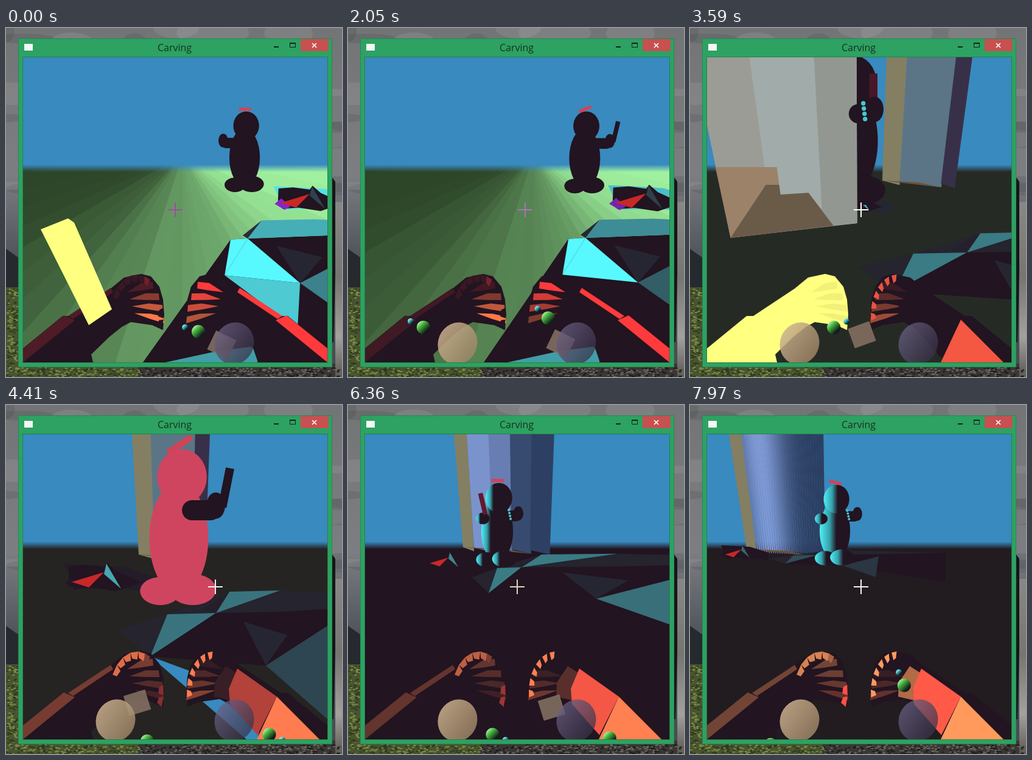
Animation of 552 by 572 pixels, one loop 8 s. Source, as an HTML page with a canvas:

```html
<!DOCTYPE html>
<html lang="en">
<head>
<meta charset="utf-8">
<title>Carving</title>
<style>
html, body { margin: 0; height: 100%; overflow: hidden; background: #444; }
canvas { display: block; }
</style>
</head>
<body>
<canvas id="stage" width="552" height="572"></canvas>
<script>
const ctx = document.getElementById('stage').getContext('2d');
const LOOP = 8000;
const TIMES = [0, 2050, 2730, 3590, 4410, 6360, 7970];
const DARK = '#221420', SKY = '#388abf', YELLOW = '#ffff80', CYAN = '#58f8ff';
let now = 0;

// ---- helpers ----
const rgb = hex => [1, 3, 5].map(i => parseInt(hex.substr(i, 2), 16));
function mix(a, b, k) {
  if (typeof a === 'number') return a + (b - a) * k;
  if (typeof a === 'string') return '#' + mix(rgb(a), rgb(b), k)
    .map(v => Math.round(v).toString(16).padStart(2, '0')).join('');
  return a.map((v, i) => mix(v, b[i], k));
}
// Interpolates values given for the key times.
function key(...values) {
  let i = 0;
  while (i < 5 && now >= TIMES[i + 1]) i++;
  return mix(values[i], values[i + 1], Math.min(1, (now - TIMES[i]) / (TIMES[i + 1] - TIMES[i])));
}
const late = (...values) => key(0, 0, 0, ...values);
const during = (a, b) => now >= a && now < b;
const clamp = v => Math.max(0, Math.min(1, v));
function shape(color, path) {
  ctx.fillStyle = color;
  ctx.fill(new Path2D((typeof path === 'string' ? path : 'M' + path.join(' ')) + 'Z'));
}
function box(color, x, y, w, h) {
  ctx.fillStyle = color;
  ctx.fillRect(x, y, w, h);
}
function oval(color, x, y, rx, ry = rx, turn = 0) {
  ctx.fillStyle = color;
  ctx.beginPath();
  ctx.ellipse(x, y, rx, ry, turn, 0, 7);
  ctx.fill();
}
function line(color, width, x0, y0, x1, y1, cap = 'butt') {
  ctx.strokeStyle = color;
  ctx.lineWidth = width;
  ctx.lineCap = cap;
  ctx.beginPath();
  ctx.moveTo(x0, y0);
  ctx.lineTo(x1, y1);
  ctx.stroke();
}
function ramp(x0, y0, x1, y1, ...stops) {
  const g = ctx.createLinearGradient(x0, y0, x1, y1);
  stops.forEach(([at, color]) => g.addColorStop(at, color));
  return g;
}
function randoms(seed) {
  return () => (seed = seed * 16807 % 2147483647) / 2147483647;
}

// ---- desktop and window frame ----
function desktop() {
  const rnd = randoms(11);
  box(ramp(0, 0, 0, 400, [0, '#737476'], [.6, '#7c7e82'], [1, '#484c54']), 0, 0, 552, 572);
  for (let i = 0; i < 70; i++) {
    ctx.globalAlpha = .12;
    oval(i % 2 ? '#c8c8c8' : '#202226', rnd() * 552, rnd() * 330, 12 + rnd() * 50, 6 + rnd() * 18);
  }
  ctx.globalAlpha = 1;
  shape('#26292e', 'M0 362 20 376 20 430 0 430');
  box('#48552f', 0, 425, 220, 147);
  box('#3a3734', 217, 550, 335, 22);
  box(ramp(0, 245, 0, 572, [0, '#8d8e8e'], [.5, '#777570'], [.8, '#a2a19d'], [1, '#5c5852']), 541, 285, 11, 287);
  shape('#15161a', 'M536 245 541 252 541 400 538 515 536 515');
  for (let i = 0; i < 500; i++) {
    const x = rnd() * 552, y = 556 + rnd() * 16;
    box(x < 217 ? (i % 2 ? '#7c8a45' : '#2c3620') : (i % 2 ? '#6c665e' : '#1c1b1c'), x, y, 4, 2);
    if (i < 150) box(i % 2 ? '#7d8a48' : '#2f381f', rnd() * 18, 425 + rnd() * 140, 4, 2);
  }
}
function windowFrame() {
  box('#248a50', 20, 17, 516, 539);
  box('#2da262', 21, 18, 514, 537);
  box('#24824c', 27, 47, 502, 502);
  box('#f4f7f5', 30, 26, 14, 11);
  ctx.font = '16px "Open Sans", "Noto Sans", sans-serif';
  ctx.textAlign = 'center';
  ctx.fillStyle = '#17321f';
  ctx.fillText('Carving', 277, 38);
  box('#17241c', 440, 30, 8, 2);
  box('#17241c', 466, 24, 10, 8);
  box('#2da262', 467, 26, 8, 5);
  box('#c75050', 484, 18, 46, 20);
  line('#fff', 1.7, 503, 25, 510, 32);
  line('#fff', 1.7, 510, 25, 503, 32);
}

// ---- world ----
// Wedges fan out from beyond the horizon, brightest towards the light.
function ground() {
  const base = key('#2c4427', '#2c4427', '#2c4427', '#262a25', '#252422', DARK, '#221c21');
  const light = key(1, 1, -1, 0, 0, 0, 0);
  const middle = key(.5, .38, .65, 0, 0, 0, 0);
  const hub = key(290, 305, 240, 270, 270, 270, 270);
  const rnd = randoms(5), count = 30;
  ctx.save();
  ctx.beginPath();
  ctx.rect(28, 224, 500, 324);
  ctx.clip();
  for (let i = 0; i < count; i++) {
    const a = i / count * Math.PI, b = (i + 1.1) / count * Math.PI;
    const side = Math.cos((a + b) / 2) * light;
    const reach = Math.abs(side) ** 1.8;
    const level = middle + (side > 0 ? 1 - middle : -middle) * reach - rnd() * .12 * middle;
    shape(mix(base, '#a5faa5', level), [hub, 208, hub + 900 * Math.cos(a), 208 + 900 * Math.sin(a),
      hub + 900 * Math.cos(b), 208 + 900 * Math.sin(b)]);
  }
  ctx.restore();
  box(ramp(0, 224, 0, 236, [0, SKY], [1, 'rgba(56,138,191,0)']), 28, 223, 500, 13);
}

// The block is carved from two faces to four, then to a round column.
function pillar() {
  const entry = [563, 704, 556, 675, 258];
  const [left, right, footLeft, footRight, y] = key(entry, entry, entry, [323, 464, 316, 435, 256],
    [207, 335, 218, 327, 251], [174, 337, 189, 330, 239], [64, 219, 93, 222, 242]);
  const tan = .24 - .11 * clamp((now - 4410) / 1500);
  const strip = (color, a, b) => shape(color, [mix(left, right, a), 48, mix(left, right, b), 48,
    mix(footLeft, footRight, b), y + 6 * b, mix(footLeft, footRight, a), y - 6 + 6 * a]);
  strip('#847f62', 0, tan);
  const faces = now < 5200 ? 2 : now < 7000 ? 4 : 32;
  for (let i = 0; i < faces; i++) {
    const middle = (i + .5) / faces;
    const glow = Math.exp(-(((middle - .2) / .3) ** 2));
    if (faces === 2) strip(i ? '#383049' : '#5b7586', i ? .81 : tan, i ? 1 : .815);
    else strip(mix('#2c3f62', '#8098d4', glow), mix(tan, 1, i / faces), mix(tan, 1, (i + 1.05) / faces));
  }
  shape('#6b5238', [footLeft, y - 6, mix(footLeft, footRight, .8), y + 5, mix(footLeft, footRight, .5), y - 3]);
}

function slab() {
  if (!during(3150, 4290)) return;
  ctx.save();
  ctx.translate((3590 - now) * .35, 0);
  shape('#9c9c96', 'M5 48 274 48 275 320 67 344');
  shape('#9b8269', 'M42 228 143 228 150 273 236 324 67 344');
  shape('#6a5b48', 'M125 257 195 257 236 324 67 344');
  shape('#a1acaa', 'M98 48 205 48 218 300 195 270 149 273 143 228 123 228');
  shape('#929891', 'M204 48 274 48 275 320 236 324 217 299');
  ctx.restore();
}

function debris() {
  const [x, y, size] = key([499, 272, .9], [490, 271, .95], [440, 272, 1], [278, 283, .6],
    [161, 274, 1], [165, 250, .58], [84, 237, .5]);
  const glow = key(.9, .75, .5, .08, .04, 0, 0);
  ctx.save();
  ctx.translate(x, y);
  ctx.scale(size, size);
  shape(mix(DARK, CYAN, glow), 'M-66-14-20-12 30-9 90 10 86 34 20 26-46 28');
  shape(DARK, 'M-57-10-30-12 0-8 5-15 20-2 62 17 20 31-20 25-50 27-58 12');
  shape(mix(DARK, '#9028d8', glow), 'M-64 18-52 8-35 23-46 29');
  shape('#c82828', 'M-53 16 0 0-25 25');
  shape(mix(DARK, CYAN, key(.2, .2, .2, .65, .65, .5, .35)), 'M4-14 28 27 0 3');
  ctx.restore();
}

// One faceted rock around its ridge; the view stretches each side of it.
function rock() {
  const [x, y, west, east, height] = key([397, 345, .35, 1.05, .85], [390, 344, .35, 1.05, .85],
    [520, 360, .95, 1.2, .8], [455, 368, 1.1, 1, .9], [345, 341, 1, 1, 1], [285, 266, .5, 1.5, .6], [210, 246, .5, .5, .2]);
  const at = (px, py) => [x + px * (px < 0 ? west : east), y + py * height];
  const brow = at(-80, 2), low = at(-108, 71), ridge = at(0, 0), hub = at(82, 86),
    peak = at(22, -35), back = at(105, -37), far = at(420, -20), deep = at(420, 220);
  const glow = key(.9, .7, .6, .45, .42, .45, .25), front = key(1, 1, 1, 0, 0, 0, 0);
  const shade = level => mix(DARK, CYAN, level);
  const near = now < 3200;

  if (!near) shape('#25242f', [...at(-162, 27), ...brow, ...peak, ...back, ...far, ...hub, ...low]);
  shape(DARK, near ? [...brow, ...ridge, ...far, 900, 700, key(222, 220, 440, 400, 400, 400, 400), 552]
    : [...low, ...ridge, ...at(105, -2), ...far, ...deep, ...hub]);
  shape(shade(glow * (near ? .75 : 1)), [...ridge, ...peak, ...back, ...(near ? far : ridge)]);
  shape(shade(Math.max(glow, front)), [...brow, ...ridge, ...low]);
  shape(shade(front), [...ridge, ...hub, ...low]);
  shape(shade(glow * .12), [...ridge, ...at(-23, -6), ...peak]);
  shape(shade(.08), [...at(45, 14), ...at(117, 36), ...hub]);
  shape(shade(key(.48, .32, .28, .2, .22, .4, .15)), [...hub, ...at(200, 10), ...at(190, 180)]);
  if (now < 1000) shape(shade(.8), [...low, ...hub, ...at(78, 176)]);
  if (now < 2400) shape(shade(.6), 'M262 548 345 530 405 522 414 548');
  if (during(3900, 5600)) shape(SKY, [...low, ...at(20, 118), ...at(85, 207), ...at(50, 207)]);
}

// The figure is built in units of its own height.
function figure() {
  const [x, foot, h] = key([392, 269, 132], [389, 271, 134], [308, 279, 160], [262, 290, 245],
    [284, 328, 255], [245, 266, 138], [238, 263, 132]);
  const top = foot - h;
  const skin = during(3900, 5200) ? '#cf4560' : DARK;
  const rim = .15 + .4 * clamp((now - 5600) / 2000);
  const part = (px, py, rx, ry) => {
    const cx = x + px * h, r = rx * h;
    oval(now < 5200 ? skin : ramp(cx - r, 0, cx + r, 0, [0, '#50f0f4'], [rim * .6, '#35a0ac'], [rim, DARK]),
      cx, top + py * h, r, ry * h);
  };
  const tilt = key(0, -.03, .03, 0, -.05, 0, .02) * h;
  line('#d04458', .04 * h, x - .07 * h, top - .03 * h - tilt, x + .08 * h, top - .03 * h + tilt);
  part(0, .57, .19, .36);
  part(-.12, .91, .13, .09);
  part(.09, .9, .15, .1);
  part(.02, .176, .16, .178);
  if (now > 5200) part(-.17, .42, .08, .07);

  return () => {
    const side = key(-.95, 1.1, 1.1, .6, .85, .9, 1);
    const hand = x + side * .28 * h, shoulder = x + side * .1 * h, y = top + .39 * h;
    if (during(1000, 2400) || during(3000, 7000)) {
      const grip = x + key(.35, .35, .35, .16, .28, -.14, -.1) * h;
      line(mix(DARK, '#701c30', late(.5, 0, .8, .8)), .055 * h, grip, y - .02 * h,
        grip + key(.06, .06, .04, 0, .05, -.06, -.05) * h, y - .27 * h);
    }
    line(DARK, .13 * h, shoulder, y, hand - side * .04 * h, y, 'round');
    oval(DARK, hand, y - .03 * h, .06 * h, .085 * h);
    if (during(3300, 3900) || now > 5700)
      for (let i = 0; i < 4; i++) oval('#48c8d0', mix(shoulder, hand, .3) + i, y + (i - 2) * .035 * h, .015 * h);
  };
}

// ---- arms, tools and floating things ----
const ARM = 'M28 525 93 472 104 472 172 427 194 409 222 403 238 407 252 424 258 445 260 470 258 495 240 487 205 482 190 490 170 506 140 535 143 548 28 548';

function fingers(first, last) {
  for (let i = 0; i < 4; i++) {
    const x = 199 + 4 * i, y = 433 + 11.5 * i, tipX = 259 - 2 * (3 - i) ** 2, tipY = 416 + 19 * i;
    shape(mix(first, last, i / 3), [x, y, mix(x, tipX, .55), mix(y, tipY, .7) - 3, tipX, tipY, tipX + 1, tipY + 11,
      mix(x, tipX, .5), mix(y, tipY, .5) + 6]);
  }
}
// Blocks on the elliptic ridge of the hand, angles in degrees.
function knuckles(color, from, to, gap) {
  const point = (deg, r) => [215 + 44 * r * Math.cos(deg * Math.PI / 180), 470 + 66 * r * Math.sin(deg * Math.PI / 180)];
  for (let a = from; a < to; a += 17)
    shape(color, [...point(a, 1), ...point(a + 17 - gap, 1), ...point(a + 15 - gap, .8), ...point(a + 2, .84)]);
}
function hand(mirrored, drawLit) {
  const flash = !mirrored && during(3450, 3750);
  ctx.save();
  if (mirrored) {
    ctx.translate(556, 0);
    ctx.scale(-1, 1);
  }
  shape(flash ? YELLOW : DARK, ARM);
  if (flash) fingers('#f2f078', '#f2f078');
  else drawLit();
  ctx.restore();
}
function arms() {
  const hue = key('#ff3a3c', '#ff3a3c', '#ff3a3c', '#ff5a44', '#ff7c50', '#ff8050', '#ff9a5c');
  const warm = (level, color = hue) => mix(DARK, color, level);
  const sleeve = color => {
    shape(color, 'M28 525 95 471 113 479 28 548');
    shape(color, 'M102 472 172 426 176 433 110 477');
  };
  hand(false, () => {
    const level = key(.2, .13, 1, .6, .38, .3, .36);
    sleeve(warm(level));
    fingers(warm(level), warm(key(1, 1, .8, .5, .15, .12, .3), '#ff7848'));
    knuckles(warm(key(.1, .1, .1, .4, .85, .7, .82)), 205, 285, 0);
    knuckles(warm(key(.35, .4, .3, .3, .4, .4, .6)), 287, 300, 4);
    knuckles(warm(key(0, 0, .5, .4, .45, .55, 1), '#ff5048'), 350, 380, 2);
  });
  hand(true, () => {
    const level = key(1, 1, .2, .1, .08, 0, 0);
    if (now < 3300) sleeve(warm(level));
    fingers(warm(level), warm(key(.65, .4, 1, .55, .45, .35, .3), '#ff7848'));
    if (now > 2730) knuckles(warm(late(.9, 1, 1, 1)), 272, 360, 6);
  });
  if (now < 2730) return;
  shape(warm(late(0, .1, .25, .65)), 'M361 428 380 440 366 465 368 484 342 478 343 455');
  shape(warm(late(0, .65, .95, 1), '#ff5a48'), 'M380 432 445 478 413 541 368 490 366 465');
  shape(warm(late(.95, 1, 1, 1)), 'M445 478 515 548 412 548');
}

function orbit(x, degrees) {
  const a = degrees * Math.PI / 180;
  [['#48b840', 62, 11], ['#40c8e0', 85, 5]].forEach(([color, reach, r]) => {
    const bx = x + reach * Math.cos(a), by = 517 + reach * Math.sin(a);
    oval(ramp(bx - r, by - r, bx + r, by + r, [.1, '#c8f8c0'], [.35, color], [.75, '#101c18']), bx, by, r);
  });
}
function orb(x, light, dark) {
  oval(ramp(x - 30, 495, x + 30, 540, [0, light], [1, dark]), x, 517, 32, 35, .4);
}
function floaters() {
  if (now > 910) orbit(180, key(100, 205, 310, 335, 393, 742, 860));
  orbit(375, key(198, 222, 130, 90, 22, 28, -112));
  if (during(0, 2400) || during(3000, 7300)) {
    ctx.save();
    ctx.translate(key(354, 349, 320, 282, 215, 334, 334), key(519, 517, 510, 503, 488, 496, 496));
    ctx.rotate(key(.45, .45, 0, -.35, -.3, -.3, -.3));
    box('rgba(136,116,100,.85)', -18, -17, 37, 34);
    ctx.restore();
  }
  if (now > 910) orb(180, 'rgba(206,180,144,.86)', 'rgba(156,130,100,.82)');
  else shape(YELLOW, 'M57 330 102 312 112 319 174 461 136 487');
  orb(375, 'rgba(108,98,134,.75)', 'rgba(52,46,66,.72)');
}

function crosshair() {
  const x = Math.round(key(278, 291, 283, 281, 344, 278, 281)), y = 297;
  const color = key('#a04ca0', '#b070b8', '#8a4a8c', '#ffffff', '#f0f0f0', '#e4d4c4', '#f4f4f8');
  box(color, x - 12, y, 24, 2);
  box(color, x - 1, y - 11, 2, 24);
}

function draw(ms) {
  now = ms;
  desktop();
  windowFrame();
  ctx.save();
  ctx.beginPath();
  ctx.rect(28, 48, 500, 500);
  ctx.clip();
  box(SKY, 28, 48, 500, 190);
  ground();
  pillar();
  debris();
  rock();
  const drawFigureArm = figure();
  slab();
  drawFigureArm();
  arms();
  floaters();
  crosshair();
  ctx.restore();
}

const start = performance.now();
function tick() {
  draw((performance.now() - start) % LOOP);
  requestAnimationFrame(tick);
}
tick();
</script>
</body>
</html>
```
